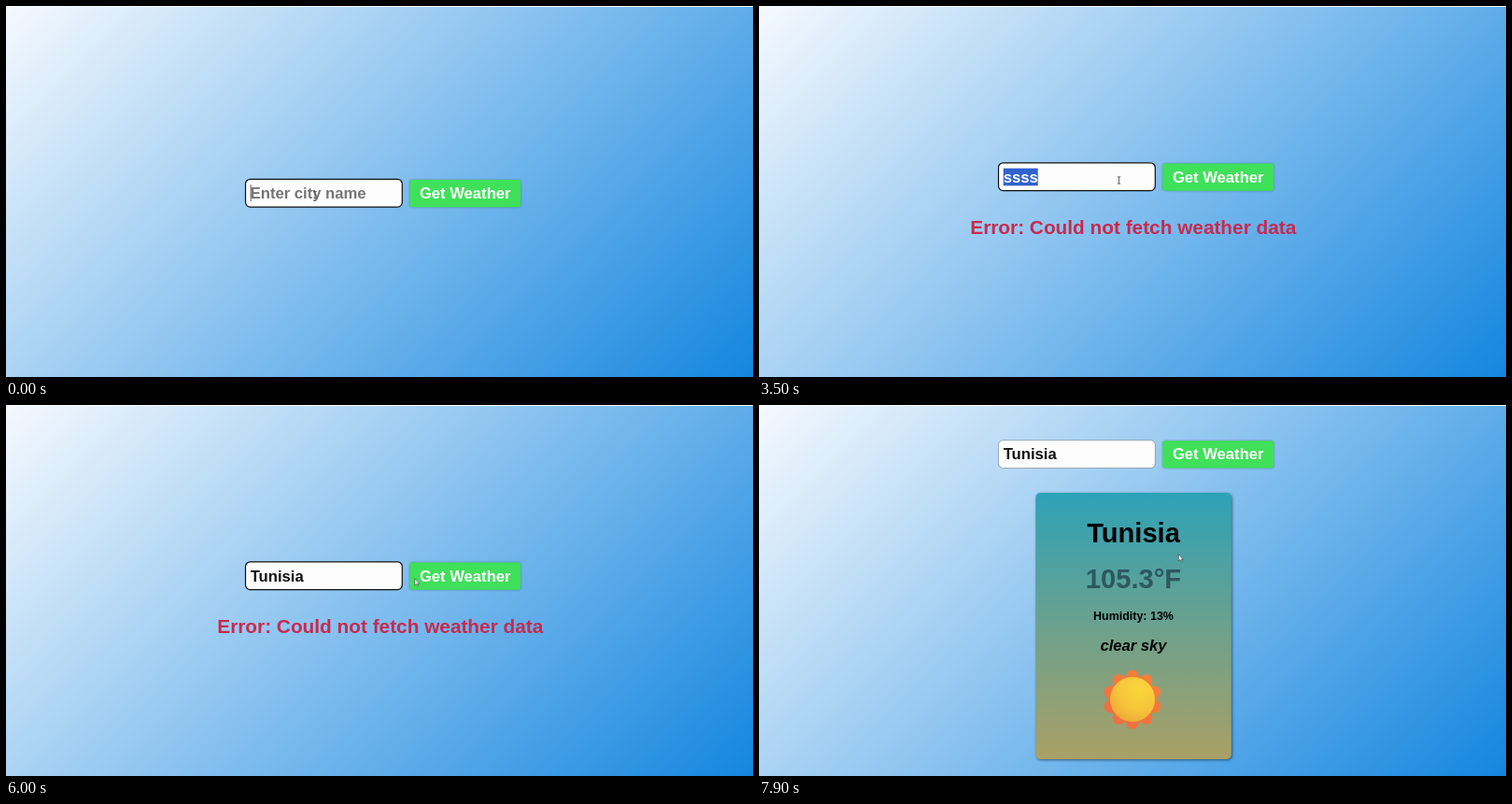
An HTML page that plays this animation: 800x397 px, repeating every 8 s.

```html
<!DOCTYPE html>
<html lang="en">
<head>
<meta charset="utf-8">
<title>Weather app</title>
<style>
  html, body { margin: 0; width: 100%; height: 100%; overflow: hidden; background: #fff; }
  .sky {
    position: absolute; left: 0; top: 1px; width: 800px; height: 396px;
    background: linear-gradient(135deg, #f5f9fe, #1486df);
  }
  svg { position: absolute; left: 0; top: 0; display: block; }
  text { font: bold 16.64px "Liberation Sans", Arial, sans-serif; white-space: pre; }
  .mid { text-anchor: middle; }
  .field { fill: #fdfdfe; stroke: rgba(20, 20, 20, .3); stroke-width: 1; }
  .focus .field { stroke: #111; stroke-width: 1.2; }
  .button { fill: #3fe05a; filter: drop-shadow(.5px .6px .8px rgba(0, 0, 0, .3)); }
  .error { font-size: 20.8px; fill: #c9294d; }
  .big { font-size: 29.12px; }
  .small { font-size: 12.48px; }
  .temp { fill: #2e5860; }
  .desc { font-style: italic; }
  .card { filter: drop-shadow(1px 1px 1.5px rgba(0, 0, 0, .5)); }
  .popup rect { fill: #f5f8fb; filter: drop-shadow(0 .8px 1.2px rgba(0, 0, 0, .3)); }
  .popup text { font: 5.4px "Open Sans", "Noto Sans", sans-serif; fill: #333; }
  .popup .code { font-size: 4.2px; font-weight: 600; }
</style>
</head>
<body>
<div class="sky"></div>
<svg width="800" height="397" viewBox="0 0 800 397">
  <defs>
    <linearGradient id="cardFill" x2="0" y2="1">
      <stop stop-color="#2da2b7"/><stop offset="1" stop-color="#aaa065"/>
    </linearGradient>
    <linearGradient id="petalFill" x1="1" x2="0" y2="1">
      <stop stop-color="#f5823b"/><stop offset="1" stop-color="#ee6b3f"/>
    </linearGradient>
    <radialGradient id="coreFill" cx=".66" cy=".28" r=".85">
      <stop stop-color="#fad63c"/><stop offset=".55" stop-color="#f5c53a"/><stop offset="1" stop-color="#eda13a"/>
    </radialGradient>
  </defs>

  <g id="form">
    <rect class="field" x="256.5" y="185.3" width="167.8" height="29.8" rx="5"/>
    <rect id="mark" x="261.7" y="191.2" height="18.6" fill="#2f62cb"/>
    <text id="value" x="261.7" y="206"></text>
    <rect id="caret" y="191.2" width=".8" height="18" fill="#333"/>
    <rect class="button" x="432.2" y="185.9" width="119" height="29.3" rx="2.6"/>
    <text class="mid" x="491.7" y="206" fill="#fff">Get Weather</text>
  </g>

  <text id="error" class="error mid" x="400.8" y="244">Error: Could not fetch weather data</text>

  <g id="popup" class="popup">
    <rect x="281" y="157.8" width="80" height="15" rx="3"/>
    <text x="288.8" y="167.6">Tunisie</text>
    <text x="318.8" y="167.6">Turquie</text>
    <text class="code" x="349.8" y="167.4">TN</text>
  </g>

  <g id="card">
    <rect class="card" x="296.3" y="94" width="209.5" height="285" rx="5" fill="url(#cardFill)"/>
    <text class="big mid" x="401" y="147">Tunisia</text>
    <text class="big temp mid" x="401" y="196">105.3°F</text>
    <text class="small mid" x="401" y="229.5">Humidity: 13%</text>
    <text class="desc mid" x="401" y="263">clear sky</text>
    <g transform="translate(400 315)">
      <path id="petals" fill="url(#petalFill)"/>
      <circle r="24" fill="url(#coreFill)"/>
    </g>
  </g>

  <path id="beam" fill="none"/>
  <path id="arrow" d="M0 0V7.2L1.7 5.7L2.8 8.1L3.9 7.6L2.8 5.3H5Z" fill="#fff" stroke="#333" stroke-width=".6"/>
</svg>
<script>
const LOOP = 8000;
const $ = id => document.getElementById(id);
const show = (id, on) => { $(id).style.display = on ? "" : "none"; };

// [time, typed text]
const typing = [
  [0, ""], [900, "s"], [1050, "ss"], [1200, "sss"], [1300, "ssss"],
  [4200, "T"], [4450, "Tu"], [4650, "Tun"], [4850, "Tuni"],
  [5050, "Tunis"], [5250, "Tunisi"], [5400, "Tunisia"]
];

// [time, x, y] of the pointer's hot spot
const path = [
  [0, 331, 202], [600, 329.5, 203], [1400, 329.5, 203], [1850, 469, 202.5],
  [2300, 469, 202.5], [2950, 385.5, 186.5], [5650, 385.5, 186.5],
  [6200, 459.8, 185.5], [6900, 459.8, 185.5], [7600, 449.3, 159.8], [8000, 449.3, 159.8]
];

const lastBefore = (list, t) => list.filter(k => k[0] <= t).pop();
const within = (t, a, b) => t >= a && t < b;

function pointerAt(t) {
  const i = Math.max(1, path.findIndex(k => k[0] > t));
  const [t0, x0, y0] = path[i - 1], [t1, x1, y1] = path[i];
  const u = (t - t0) / (t1 - t0), e = u * u * (3 - 2 * u);
  return [x0 + (x1 - x0) * e, y0 + (y1 - y0) * e];
}

function buildSun() {
  const disc = (x, y, r) =>
    `M${x - r} ${y}a${r} ${r} 0 1 1 ${2 * r} 0a${r} ${r} 0 1 1 ${-2 * r} 0`;
  let d = disc(0, 0, 26);
  for (let i = 0; i < 10; i++) {
    const a = i * Math.PI / 5 - Math.PI / 2;
    d += disc(25 * Math.cos(a), 25 * Math.sin(a), 6.6);
  }
  $("petals").setAttribute("d", d);
}

function buildBeam() {
  const d = "M-1.8 -3.6H1.8M0 -3.6V3.6M-1.8 3.6H1.8";
  const beam = $("beam");
  beam.setAttribute("d", d);
  beam.setAttribute("stroke", "#444");
  beam.setAttribute("stroke-width", ".8");
}

function draw(t) {
  const failed = within(t, 2000, 6400), done = t >= 6400;
  const focused = t < 1900 || within(t, 3050, 6300);
  const selected = within(t, 3250, 4200);
  const shift = done ? -147.6 : failed ? -17.5 : 0;

  const [typedAt, text] = lastBefore(typing, t);
  const value = $("value");
  value.textContent = text || "Enter city name";
  value.setAttribute("fill", selected ? "#fff" : text ? "#111" : "#757575");
  const width = text ? value.getComputedTextLength() : 0;

  $("form").setAttribute("transform", `translate(0 ${shift})`);
  $("form").setAttribute("class", focused ? "focus" : "");
  $("mark").setAttribute("width", width);
  $("caret").setAttribute("x", 261.7 + width);
  show("mark", selected);
  show("caret", focused && !selected && (t - typedAt) % 1000 < 500);
  show("popup", within(t, 4500, 5600));
  show("error", failed);
  show("card", done);

  const [x, y] = pointerAt(t);
  const inField = x > 256 && x < 424 && Math.abs(y - 200 - shift) < 15;
  show("beam", inField);
  show("arrow", !inField);
  $(inField ? "beam" : "arrow").setAttribute("transform", `translate(${x} ${y})`);
}

buildSun();
buildBeam();
const start = performance.now();
function tick() {
  draw((performance.now() - start) % LOOP);
  requestAnimationFrame(tick);
}
tick();
</script>
</body>
</html>
```
